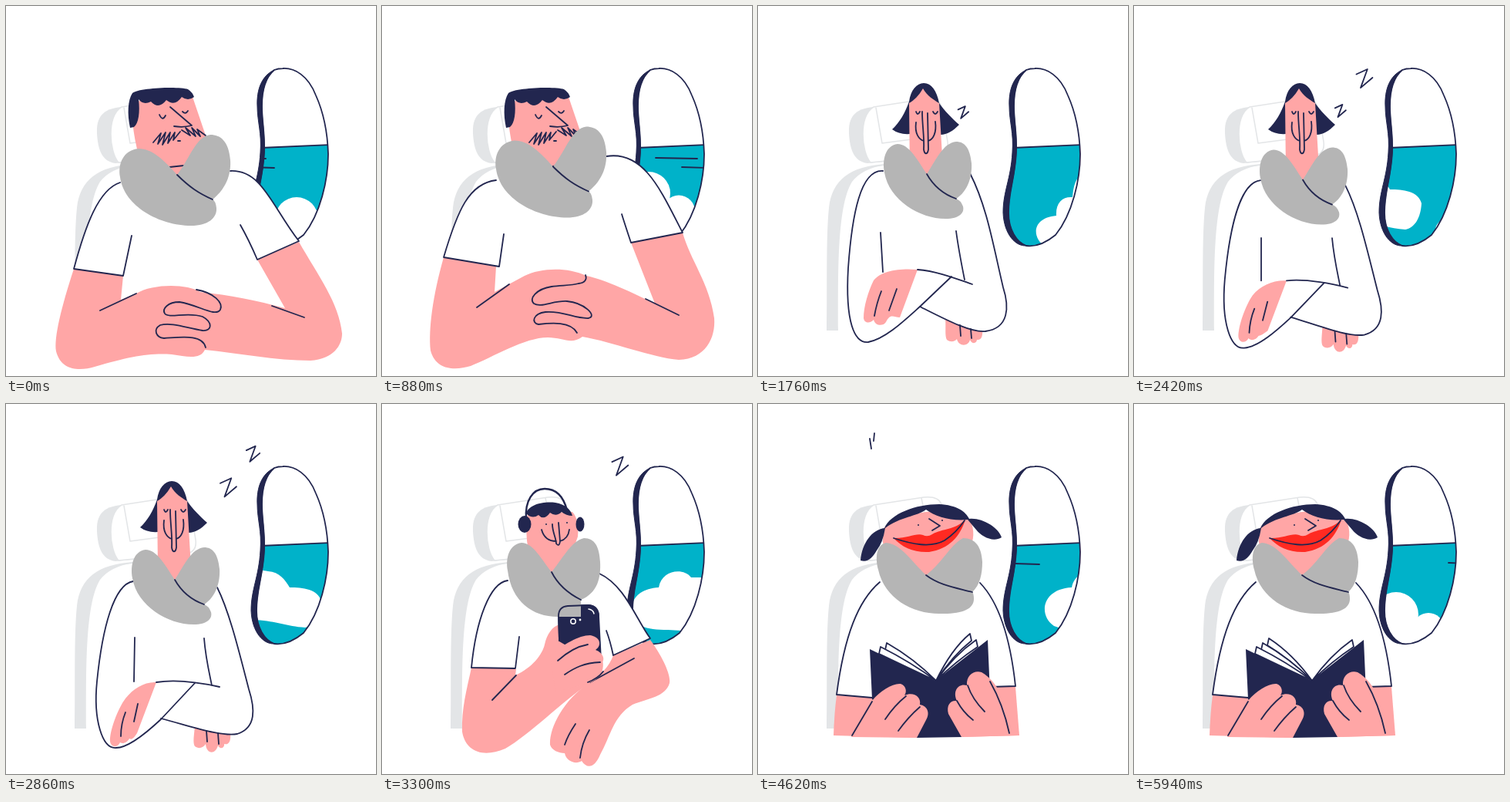
These frames come from a looping animation (480 by 480 pixels, 6.16 s). An HTML page:

```html
<!DOCTYPE html>
<html lang="en">
<head>
<meta charset="utf-8">
<title>Passengers</title>
<style>
html, body { margin: 0; width: 100%; height: 100%; overflow: hidden; background: #fff; }
svg { display: block; width: 100vw; height: 100vh; }
path { stroke-linecap: round; stroke-linejoin: round; }
</style>
</head>
<body>
<svg id="stage" viewBox="0 0 480 480"></svg>
<script>
const STEP = 220, COUNT = 28;
const NAVY = '#22264f', PINK = '#ffa6a6', TEAL = '#00b2c9', GREY = '#b5b5b5', RED = '#ff2a22', PALE = '#e3e5e7';
const stage = document.getElementById('stage');

const fill = (d, c = '#fff') => `<path d="${d}" fill="${c}"/>`;
const line = (d, c = NAVY, w = 1.8) => `<path d="${d}" fill="none" stroke="${c}" stroke-width="${w}"/>`;
const both = (d, c = '#fff', s = NAVY, w = 1.8) => `<path d="${d}" fill="${c}" stroke="${s}" stroke-width="${w}"/>`;
const dot = (x, y, r, c = '#fff') => `<circle cx="${x}" cy="${y}" r="${r}" fill="${c}"/>`;
const oval = (x, y, rx, ry, c) => `<ellipse cx="${x}" cy="${y}" rx="${rx}" ry="${ry}" fill="${c}"/>`;
const box = (x, y, w, h, c = '#fff') => `<rect x="${x}" y="${y}" width="${w}" height="${h}" fill="${c}"/>`;
const move = (x, y, s) => `<g transform="translate(${x} ${y})">${s}</g>`;

// Blend two paths that share the same commands
function mix(a, b, p) {
  const to = b.match(/-?[\d.]+/g);
  let k = 0;
  return a.replace(/-?[\d.]+/g, n => (+n + (to[k++] - n) * p).toFixed(2));
}

const breath = i => (1 - Math.cos(2 * Math.PI * i / 13)) / 2;

// ---- window ----
const PANE = 'M348 83C336 93 332 110 332 130C332 150 336 165 335 190C333 225 325 240 325 268C325 290 335 306 348 311C362 313 375 306 386 297C408 270 418 225 418 192C417 160 411 136 402 116C392 90 374 80 359 81Q353 81 348 83Z';
const RIM = 'M348 83C332 90 325 108 326 130C326 150 332 165 330 190C328 225 318 240 318 268C319 296 334 312 348 311C335 306 325 290 325 268C325 240 333 225 335 190C336 165 332 150 332 130C332 110 336 93 348 83Z';

function sky(i) {
  let s = '';
  if (i < 7) {
    s += dot(377 + 2 * i, 276 - 2.3 * i, 28 - 1.7 * i) + dot(322 + 6 * i, 275 - 8 * i, 28) + box(310, 276 - 3.5 * i, 120, 60);
    s += move((i - 4) * 18, 0, line('M355 197L409 198M389 209L420 210'));
  } else if (i < 14) {
    s += move((i - 8) * 10, 0, fill('M372 312C355 300 355 275 387 272C386 255 395 247 408 248C409 235 412 222 420 220L520 220L520 320Z'));
    s += move((i - 13) * 18, 0, fill('M230 230C280 205 328 215 340 217C355 218 362 228 368 238C385 238 405 240 409 256C408 275 400 288 388 290C362 288 350 281 320 280L230 285Z') + line('M300 241L327 241'));
  } else {
    s += move((i - 18) * 8, 0, fill('M360 288C340 275 343 240 383 238C387 215 415 212 425 225L520 225L520 300L395 293C380 293 370 292 360 288Z'));
    if (i > 20) s += move((i - 21) * 18, 0, line('M300 206L365 208'));
    if (i > 22) s += move((i - 27) * 6, (27 - i) * 8, dot(340, 273, 29) + dot(382, 291, 20) + box(280, 281, 118, 60));
  }
  return s;
}

const pane = i => `<clipPath id="pane"><path d="${PANE}"/></clipPath>` + fill(PANE) +
  `<g clip-path="url(#pane)">${fill('M300 185L430 180L430 320L300 320Z', TEAL)}${sky(i)}${line('M330 184L420 180')}</g>` +
  line(PANE) + both(RIM, NAVY, NAVY, 1);

// ---- seat ----
const seat = fill('M89 421C90 370 88 300 92 262C96 225 120 208 165 205L165 421Z', PALE) +
  fill('M104 421C104 350 102 260 122 228Q135 211 165 206L200 206L200 421Z') +
  line('M122 222Q135 209 165 206', PALE, 1.5) +
  fill('M150 131C125 133 117 145 118 165C119 185 124 202 142 204L165 202Z', PALE) +
  both('M150 131L215 121Q234 119 238 130L246 176Q248 190 236 194L146 203C134 190 130 142 150 131Z', '#fff', PALE, 1.5) +
  line('M153 132L161 178L222 170L212 122', PALE, 1.5);

// ---- sleeping man with folded arms ----
function manAsleep(i) {
  const p = breath(i) / breath(4), m = (a, b) => mix(a, b, p);
  const left = m('M148 229C120 238 103 285 88 341L152 350L163 298', 'M148 226C113 230 98 265 80 326L152 338L158 296');
  const right = m('M291 214C332 212 345 260 380 305L326 329C320 315 312 298 304 284', 'M291 195C340 187 362 240 390 294L323 307C319 295 315 283 311 270');
  const shirt = m('M148 229C120 238 103 285 88 341L152 350L149 395L362 395L326 329L380 305C345 260 332 212 291 214Z',
    'M148 226C113 230 98 265 80 326L152 338L146 388L354 388L323 307L390 294C362 240 340 187 291 195Z');
  const arms = m('M88 341C72 390 62 430 65 448C72 475 98 473 115 468C160 455 185 450 215 452C235 455 252 459 258 446C300 450 350 460 395 460C425 458 436 440 436 425C432 385 405 350 380 306L326 329L362 392C325 382 290 375 252 371C235 360 190 360 169 373L149 381L152 350Z',
    'M80 326C66 375 60 420 63 447C70 473 95 473 115 467C145 455 185 430 215 430C235 430 245 440 260 429C300 436 350 456 385 459C420 458 433 430 431 405C425 360 400 330 390 294L323 307L354 386C325 372 290 355 265 350C240 338 205 340 185 350L146 371L148 338Z');
  const hands = m('M247 368C270 372 282 385 278 394C272 404 250 388 225 384C210 384 202 393 206 399C212 406 235 396 255 403C268 410 268 422 255 421C235 418 215 410 200 414C190 420 195 430 205 431C225 430 255 425 259 443',
    'M264 349C266 354 264 359 255 360C245 363 232 362 220 364C200 367 190 380 197 386C206 392 222 382 240 383C262 385 280 402 268 405C250 406 235 395 212 397C196 399 193 411 203 413C220 411 245 409 253 424');
  const creases = m('M122 395L169 373M345 389L387 404', 'M123 391L165 361M342 380L385 401');
  return fill(shirt) + fill(arms, PINK) + line(left) + line(right) + line(creases) + line(hands) +
    fill('M162 125L240 112L259 168L242 215L222 222L178 210Q165 180 162 125Z', PINK) +
    fill('M161 158C157 140 158 122 164 113C172 106 225 104 236 108Q242 112 244 118Q236 124 228 118Q219 131 208 122Q198 135 188 124Q178 129 172 121C174 138 172 152 166 157Z', NAVY) +
    line('M199 141Q203 150 207 142M229 137Q233 141 236 136M213 131L241 155Q230 158 218 156M223 175L226 175M212 209L240 206') +
    line('M191 177L201 165L197 179L207 164L203 180L213 164L210 178L219 164L217 174L226 163M228 161L239 168L233 158L246 169L241 158L252 169L248 160L259 168') +
    move(0, -10.5 * p, fill('M222 219C205 200 190 185 172 185C152 187 145 205 148 222C153 260 200 285 240 285C262 285 274 275 273 262Q272 253 268 251C288 235 292 215 291 200C289 175 278 167 265 167C246 170 240 195 222 219Z', GREY) +
      line('M222 219C238 235 250 243 268 251'));
}

// ---- sleeping woman ----
function womanAsleep(i) {
  const p = breath(i) / breath(8), m = (a, b) => mix(a, b, p);
  const left = m('M165 230C140 234 125 290 118 360C113 410 125 448 143 446C160 446 185 424 201 409L245 362', 'M162 214C133 212 122 270 117 340C113 410 125 438 143 436C165 432 190 408 210 390L251 351');
  const right = m('M201 408C240 418 280 432 300 428C325 420 323 395 315 370C302 320 290 270 274 238', 'M210 390C240 405 275 424 295 422C326 418 326 390 318 365C305 310 297 260 275 217');
  const torso = m('M165 230C140 234 125 290 118 360C113 410 125 448 143 446C160 446 185 424 201 408C240 418 280 432 300 428C325 420 323 395 315 370C302 320 290 270 274 238Z',
    'M162 214C133 212 122 270 117 340C113 410 125 438 143 436C165 432 190 408 210 390C240 405 275 424 295 422C326 418 326 390 318 365C305 310 297 260 275 217Z');
  const hand = m('M195 361C180 360 165 369 155 382C145 395 134 425 135 438C137 447 146 445 148 439C152 442 158 438 160 434C164 437 168 430 170 427C178 427 183 420 184 414Z',
    'M207 342C185 340 160 343 150 356C143 370 137 390 137 405C138 412 146 412 150 407C152 415 162 416 166 410L172 398C176 404 184 404 187 398Z');
  const under = m('M245 418C244 430 242 440 245 444C250 448 256 446 259 441C260 455 272 455 275 443C278 449 284 446 283 441C290 443 292 436 291 426Z',
    'M243 405C244 418 242 428 245 433C250 437 256 435 258 432C260 442 273 442 275 433C278 440 284 437 284 433C290 434 292 428 291 418Z');
  const details = m('M167 303L166 360M257 304C259 330 264 350 267 365M195 361C220 357 250 361 277 367M155 400Q149 415 149 431M171 389L166 412M260 424L261 438M275 427L276 441',
    'M159 294L162 345M257 292C260 315 264 335 268 355M207 342C232 344 255 353 278 361M160 370Q154 385 151 402M180 367L170 395M262 414L263 428M276 419L277 431');
  return fill(under, PINK) + fill(torso) + fill(hand, PINK) + line(left) + line(right) + line(details) +
    fill('M196 124C198 109 206 100 215 100C225 100 232 110 235 126C242 136 252 146 261 154C253 162 245 167 237 167L197 166Q183 167 174 160C184 151 191 138 196 124Z', NAVY) +
    fill('M214 107C208 117 203 122 196 126L197 215L219 230L240 212L235 126C228 122 219 116 214 107Z', PINK) +
    line('M205 137Q207 143 210 137M227 137Q230 143 233 137M213 137C213 155 216 170 215 186C216 193 220 193 221 186L220 139M205 151C203 166 209 173 215 175M230 150C232 165 227 173 221 175') +
    move(0, 10 * (1 - p), fill('M219 218C207 200 196 179 181 179C165 181 161 200 164 216C170 252 210 276 243 276C262 276 268 268 266 260Q263 252 257 250C273 240 278 220 277 204C275 184 268 176 257 176C240 178 232 198 219 218Z', GREY) +
      line('M219 218C228 234 240 244 257 250'));
}

// ---- man with phone ----
function manWithPhone(i) {
  const tap = i % 2 ? -3 : 0;
  return fill('M163 229C140 232 122 280 116 342L174 344L174 400L300 380L300 326L348 304C330 280 315 235 282 220Z') +
    fill('M116 342L174 344L173 352C195 342 208 325 211 312C214 298 221 289 230 286L285 330C290 342 285 355 268 363C235 385 190 430 160 447C130 460 108 450 104 425C103 395 110 370 116 342Z', PINK) +
    fill(`M300 326L348 306C362 325 375 350 373 362C368 380 345 382 325 390C300 405 297 430 283 455C276 472 266 474 259 463C252 468 239 464 237 453C${232 + tap} ${456 + tap} 220 ${452 + tap} 218 442C217 420 235 385 268 362C284 352 295 340 300 326Z`, PINK) +
    line('M163 229C140 232 122 280 116 342L173 343L178 302M282 220C315 235 330 280 348 304L300 326C297 312 294 302 291 294M143 384L174 352M270 361L327 330M251 415Q241 430 237 442M269 423Q259 440 257 459') +
    both('M230 307L229 275Q229 263 241 262L268 261Q280 262 281 274L284 332L278 335Z', NAVY) +
    `<circle cx="248" cy="282" r="3.2" fill="none" stroke="#fff" stroke-width="1.5"/>` + dot(257, 280, 1.4) + line('M268 266Q274 267 275 272', '#fff', 1.5) +
    fill('M218 325C236 312 255 300 270 300C283 302 286 313 277 319C288 323 290 333 284 337C291 346 280 358 268 362L225 374Z', PINK) +
    line('M228 333C238 324 250 315 267 312M237 351C250 342 262 336 283 335M267 361Q280 356 287 347') +
    fill('M189 142L247 140Q256 150 254 172L240 212L220 224L195 205Q184 180 189 142Z', PINK) +
    fill('M187 142C190 131 208 126 225 128C238 130 245 137 247 145Q239 145 233 140Q226 147 218 141Q210 152 203 144Q195 150 187 142Z', NAVY) +
    line('M187 150C185 125 196 110 211 110C228 110 236 122 240 138', NAVY, 2.4) + oval(185, 156, 8.5, 11, NAVY) + oval(257, 156, 5.5, 9.5, NAVY) +
    dot(213, 156, 1, NAVY) + dot(240, 154, 1, NAVY) +
    line('M207 163C210 174 218 178 226 178M231 178C238 176 242 171 243 163M221 156C221 166 226 174 226 181Q230 186 231 178L229 154') +
    fill('M220 218C208 203 196 180 181 180C165 182 160 200 163 216C168 256 195 276 228 276L258 276L258 254C280 245 284 225 283 205C282 185 276 174 262 174C245 178 235 200 220 218Z', GREY) +
    line('M220 218C228 234 242 246 258 254') +
    both('M230 307L229 275Q229 263 241 262L268 261Q280 262 281 274', 'none');
}

// ---- woman with book ----
function page(x, y) {
  const cx = 231 + (x - 231) * .45, side = x < 231 ? -2 : 2;
  return both(`M231 359Q${cx} ${y + 20} ${x} ${y}L${x + side} ${y + 9}Q${cx + side} ${y + 28} 231 359Z`);
}

function womanReading(i) {
  const p = Math.min(1, (i - 21) / 4), a = Math.PI * p;
  const turning = page(225 + 50 * Math.cos(a), 298 + 6 * p - 16 * Math.sin(a));
  return fill('M158 231C130 255 112 300 102 377L148 400L304 400L334 366C328 310 315 260 288 232Z') +
    fill('M102 378L150 381L205 433L98 430Q99 400 102 378Z', PINK) + fill('M300 367L334 367L339 430L265 432Z', PINK) +
    line('M158 231C130 255 112 300 102 377L148 381M288 232C315 260 328 310 334 366L302 367') +
    fill('M145 318L230 359L298 306L301 375L266 432L205 433L148 383Z', NAVY) +
    turning + page(283, 306) + page(167, 310) + page(159, 315) +
    fill('M121 432L148 385C158 372 175 362 185 363C193 366 193 374 190 378C202 373 212 380 210 390C221 392 223 402 218 410L206 433Z', PINK) +
    fill('M264 432L247 402C244 390 250 384 258 385C252 372 260 362 271 365C270 352 280 345 290 348C302 355 312 367 319 386L338 430Z', PINK) +
    line('M122 430L148 386M192 379Q177 391 165 409M210 393Q195 406 182 424M326 427Q318 390 301 360M258 385Q266 400 279 410M272 365Q278 383 294 399') +
    fill('M163 163C165 152 195 143 218 140C240 138 268 143 277 155Q284 175 270 195L218 226L165 195Q160 178 163 163Z', PINK) +
    fill('M164 161C172 142 205 130 235 130C258 131 270 140 274 149C290 147 312 160 316 173C305 180 290 172 283 163Q277 156 272 150C250 152 230 146 218 137C206 146 185 146 165 161Q162 180 154 190C148 200 142 206 133 203C135 180 148 163 164 161Z', NAVY) +
    dot(208, 157, 1, NAVY) + dot(239, 151, 1, NAVY) + line('M222 149L236 158L226 164') +
    fill('M176 174C192 175 205 167 214 170Q220 173 226 169C240 161 255 164 269 150C262 172 248 188 222 192C202 193 187 186 176 174Z', RED) +
    line('M176 174C200 182 224 187 242 177C254 169 262 160 268 151') +
    fill('M218 222C200 205 185 181 166 180C153 183 152 200 156 215C164 252 200 272 235 272C265 273 280 266 280 253Q280 246 278 244C288 235 291 220 291 205C290 185 282 174 266 174C250 182 240 205 218 222Z', GREY) +
    line('M218 222C235 235 255 238 278 244');
}

// ---- floating marks ----
function snore(f) {
  if (f < 0 || f > 1.03) return '';
  const s = Math.max(.02, 1.1 * Math.min(.65 + 1.2 * f, 1, (1 - f) * 3.2));
  const at = (x, y) => `${266 + 73 * f + x * s} ${138 - 99 * f + y * s}`;
  return line(`M${at(-9, -5)}L${at(4, -11)}L${at(-4, 11)}L${at(10, -1)}`);
}

function marks(i) {
  let s = '';
  if (i > 7 && i < 20) s += snore((i - 8) * .148) + snore(.3 + (i - 13) * .14);
  if (i > 15 && i < 20) s += move((18 - i) * 1.7, (18 - i) * 12, line('M153 67L149 82L157 90L159 84L153 67M155 94L156 98'));
  if (i > 19 && i < 23) s += move((21 - i) * 1.7, (21 - i) * 12, line('M145 45L147 58M151 38L150 48'));
  return s;
}

const people = [manAsleep, womanAsleep, manWithPhone, womanReading];
let shown = -1;

function tick() {
  const i = Math.floor(performance.now() / STEP) % COUNT;
  if (i !== shown) {
    shown = i;
    stage.innerHTML = pane(i) + seat + people[Math.floor(i / 7)](i) + marks(i);
  }
  requestAnimationFrame(tick);
}
tick();
</script>
</body>
</html>
```
